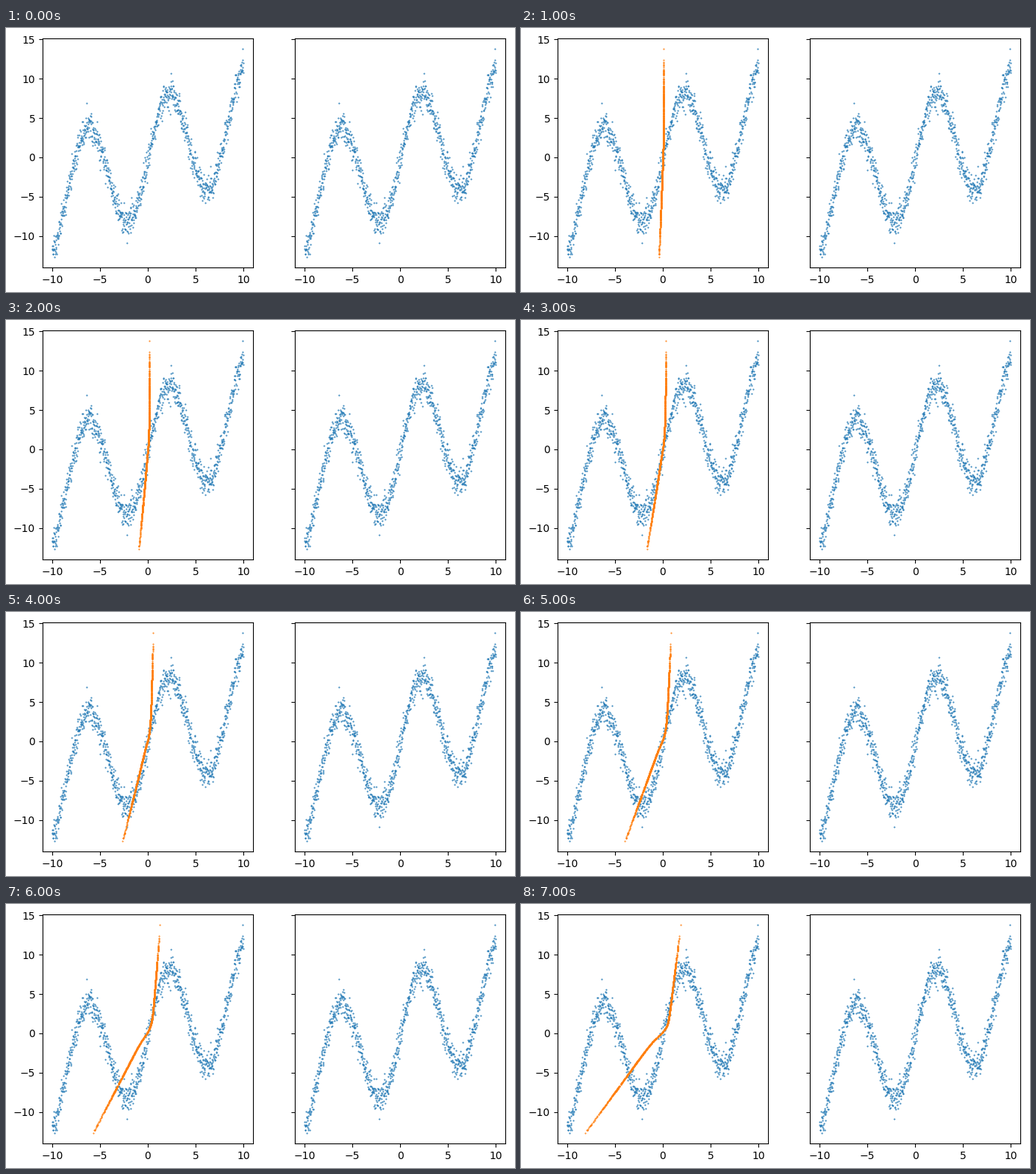
Write a matplotlib script that moves like this. It is 682 by 355 pixels and loops after 8000 ms.

```python
import numpy as np
import matplotlib.pyplot as plt
from matplotlib.animation import FuncAnimation

W, H, DPI = 682, 355, 100
PANEL_W, PANEL_H = 281.82, 308
PANEL_X, PANEL_Y = 49, 33
PANEL_STEP = 338.18
LOW, HIGH = -12.65, 13.78

plt.rcParams["font.family"] = "DejaVu Sans"


def make_data():
    rng = np.random.default_rng(7)
    x = np.linspace(-10, 10, 1000)
    y = 7 * np.sin(0.75 * x) + 0.5 * x + 0.95 * rng.normal(size=x.size)
    y = np.clip(y, -12.4, 12.4)
    # The points that stand out most
    for px, py in [(9.91, HIGH), (-9.75, LOW), (-6.4, 6.9),
                   (2.45, 10.7), (-2.2, -10.9)]:
        y[np.argmin(abs(x - px))] = py
    return x, y


def fitted(y, step):
    """Two straight arms with a soft bend, spreading out as training goes on."""
    bottom = -1.134 * np.expm1(0.3 * step)
    top = 0.207 * np.expm1(0.33 * step)
    bend_x = 0.23 * (1 - np.exp(-0.45 * step))
    bend_y = 0.7
    soft = 2.5 - 0.3 * step
    swell = 0.16 * top

    lower = (bend_x - bottom - swell) / (bend_y - LOW)
    upper = (top - swell - bend_x) / (HIGH - bend_y)
    d = y - bend_y
    arms = bend_x + upper * d - (lower - upper) * soft * np.logaddexp(0, -d / soft)
    return arms + swell * np.tanh(y + 0.3)


def add_panel(left):
    ax = fig.add_axes([left / W, PANEL_Y / H, PANEL_W / W, PANEL_H / H])
    pad = 0.05 * (HIGH - LOW)
    ax.set(xlim=(-11, 11), ylim=(LOW - pad, HIGH + pad),
           xticks=range(-10, 11, 5), yticks=range(-10, 16, 5))
    ax.plot(x, y, ".", ms=1, color="C0")
    return ax


x, y = make_data()
fig = plt.figure(figsize=(W / DPI, H / DPI), dpi=DPI, facecolor="white")
left_ax = add_panel(PANEL_X)
right_ax = add_panel(PANEL_X + PANEL_STEP)
right_ax.tick_params(labelleft=False)
fit_dots, = left_ax.plot([], [], ".", ms=1, color="C1")


def update(step):
    fit_dots.set_data(fitted(y, step), y)
    fit_dots.set_visible(step > 0)
    return fit_dots,


anim = FuncAnimation(fig, update, frames=8, interval=1000, repeat=True,
                     repeat_delay=0)
plt.show()
```
